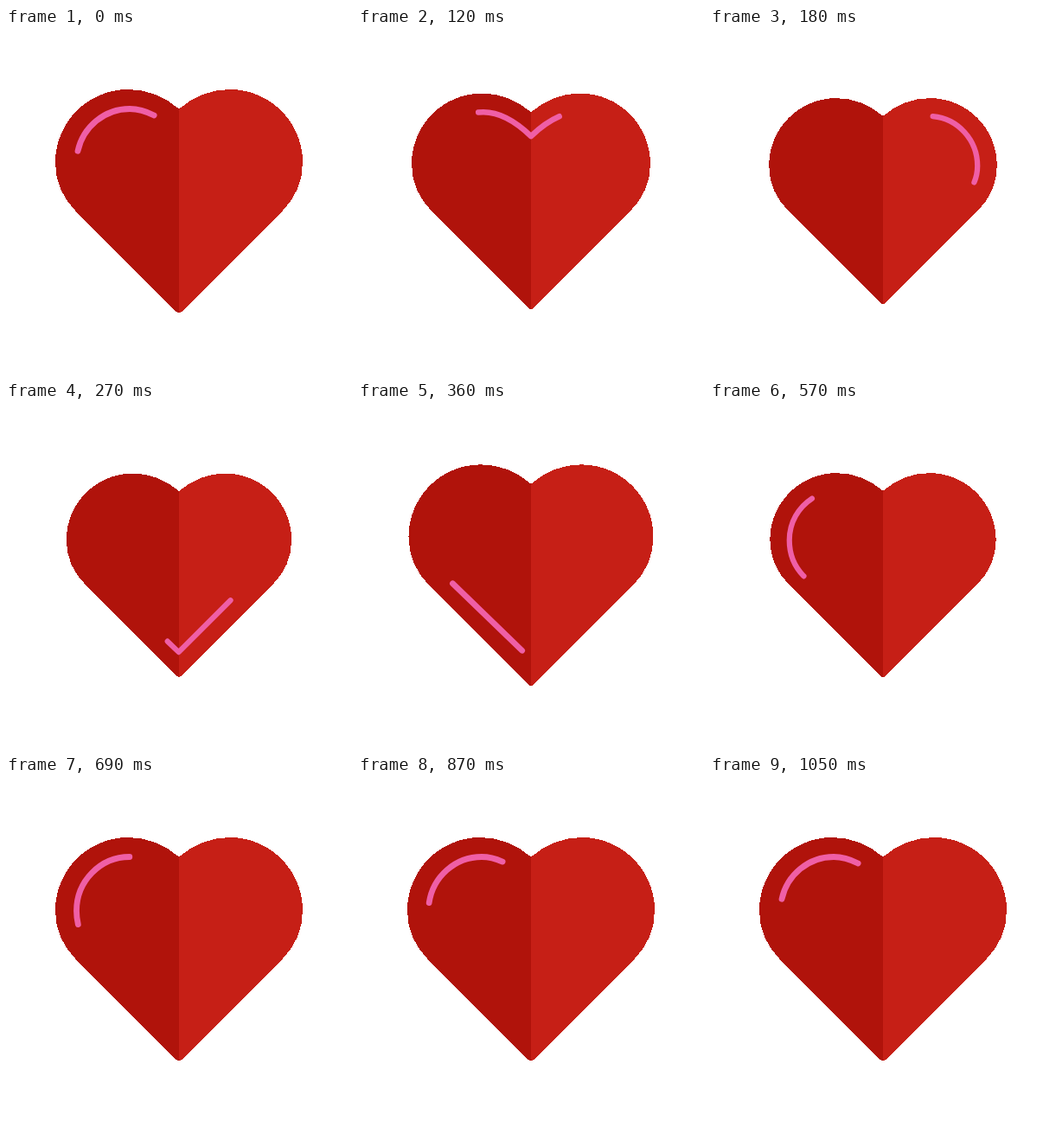
These frames come from a looping animation (400 px wide and 400 px high, 2.26 s). An HTML page:

```html
<!DOCTYPE html>
<html lang="en">
<head>
<meta charset="utf-8">
<title>Beating heart</title>
<style>
  html, body { margin: 0; width: 100%; height: 100%; overflow: hidden; background: #fff; }
  svg { display: block; width: 100%; height: 100%; }
  use { shape-rendering: crispEdges; }
  #glint {
    fill: none;
    stroke: #ef5fa6;
    stroke-width: 6.8;
    stroke-linecap: round;
    stroke-linejoin: round;
    stroke-dasharray: 113 591;
  }
</style>
</head>
<body>
<svg viewBox="-200 -200 400 400">
  <defs>
    <path id="half" d="M0-106.5C-17-121-37-129-58.5-129C-105.2-129-143-91.2-143-44.5
      C-143-22.1-134.5-3.4-118.7 12.5L-3 128.2Q-1.6 129.4 0 129.4Z"/>
  </defs>
  <g id="heart">
    <use href="#half" fill="#b0130b"/>
    <use href="#half" fill="#c61f16" transform="scale(-1 1)"/>
    <path id="glint" pathLength="704" d="M0-77.7C17-94 37-106.5 57-106.5C91-106.5 118.5-78.5 118.5-44
      C118.5-28 111.5-14 100-2.5L-.4 97.9L-100.5 1.2C-112-10.5-118.5-27-118.5-44
      C-118.5-78.5-91-106.5-57-106.5C-37-106.5-17-94 0-77.7Z"/>
  </g>
</svg>
<script>
  const LOOP = 2260, STEP = 30, LAP_TIME = 1000;
  const LAP = 704, TAIL = 555;
  const BEATS = [[40, 1], [240, 0.9], [390, 1], [533, 0.9], [693, 1]];

  const heart = document.getElementById('heart');
  const glint = document.getElementById('glint');
  const smooth = u => u * u * (3 - 2 * u);

  // Same curve as cubic-bezier(.28, 0, .02, 1)
  function lapEase(x) {
    if (x >= 1) return 1;
    let low = 0, high = 1;
    for (let i = 0; i < 30; i++) {
      const u = (low + high) / 2, v = 1 - u;
      if (0.84 * u * v * v + 0.06 * u * u * v + u ** 3 < x) low = u; else high = u;
    }
    return smooth(low);
  }

  function beatScale(time) {
    const next = BEATS.findIndex(([at]) => at > time);
    if (next <= 0) return 1;
    const [t0, from] = BEATS[next - 1], [t1, to] = BEATS[next];
    return from + (to - from) * smooth((time - t0) / (t1 - t0));
  }

  function draw() {
    const now = performance.now() % LOOP;
    const time = Math.floor((now + 0.5) / STEP) * STEP % LOOP;
    const tail = (TAIL + LAP * lapEase(time / LAP_TIME)) % LAP;
    heart.setAttribute('transform', `scale(${beatScale(time)})`);
    glint.style.strokeDashoffset = LAP - tail;
    requestAnimationFrame(draw);
  }
  draw();
</script>
</body>
</html>
```
